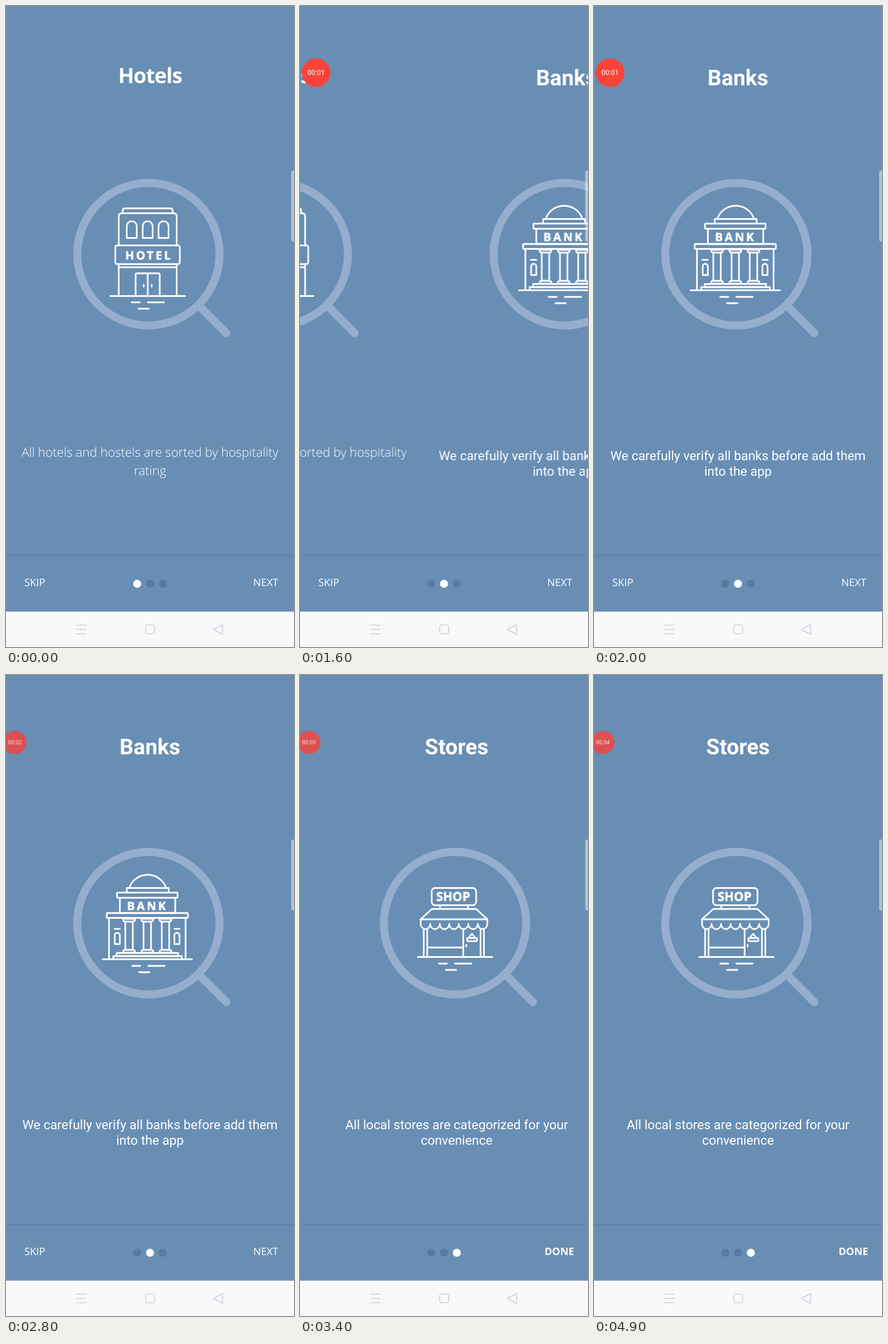
An HTML page for the animation above (5000 ms loop, 502 by 1115 pixels).

```html
<!DOCTYPE html>
<html lang="en">
<head>
<meta charset="utf-8">
<title>Onboarding</title>
<style>
html, body { margin: 0; width: 100%; height: 100%; overflow: hidden; background: #688eb4; }
svg { position: absolute; left: 0; top: 0; display: block; }
.anim { animation: 5s infinite; }
text { fill: #fff; text-rendering: geometricPrecision; }
.mid { text-anchor: middle; }
.title { font: 700 38px Roboto, sans-serif; }
.copy { font: 400 22.4px Roboto, sans-serif; }
.title.soft { font: 700 36.5px "Noto Sans", sans-serif; letter-spacing: -1px; }
.copy.soft { font: 300 21.8px "Open Sans", sans-serif; }
.button { font: 400 17.8px "Open Sans", sans-serif; }
.done { font: 700 17.8px "Noto Sans", sans-serif; }
.sign { font: 700 20px "Noto Sans", sans-serif; stroke-width: .6; }
.icon { fill: none; stroke: #fff; stroke-width: 2.8; stroke-linecap: round; stroke-linejoin: round; }
.lens { fill: none; stroke: #95aecd; stroke-width: 14; stroke-linecap: round; }
.nav { fill: none; stroke: #d0cfd4; stroke-width: 1.5; stroke-linejoin: round; }

#track { animation-name: swipe; }
@keyframes swipe {
  0%, 26.8% { transform: translateX(0); animation-timing-function: cubic-bezier(.5, 0, .8, .7); }
  32% { transform: translateX(-287px); animation-timing-function: cubic-bezier(.2, .54, .3, 1); }
  39% { transform: translateX(-502px); animation-timing-function: linear; }
  61.4% { transform: translateX(-502px); animation-timing-function: cubic-bezier(.5, 0, .8, .7); }
  64% { transform: translateX(-733px); animation-timing-function: cubic-bezier(.2, .54, .3, 1); }
  71%, 100% { transform: translateX(-1004px); }
}
#dot { animation-name: page; animation-timing-function: step-end; }
@keyframes page {
  0% { transform: translateX(0); }
  30% { transform: translateX(22.3px); }
  63%, 100% { transform: translateX(44.6px); }
}
#skip, #done { animation-name: last; animation-timing-function: step-end; }
#done { --a: 0; --b: 1; }
#skip { --a: 1; --b: 0; }
@keyframes last { 0% { opacity: var(--a); } 63%, 100% { opacity: var(--b); } }

#badge {
  position: absolute; left: 3px; top: 91px; width: 50px; height: 50px; border-radius: 50%;
  background: #f84338; color: #fff; font: 400 12px/16px Roboto, sans-serif; text-align: center;
  animation-name: dock;
}
@keyframes dock {
  0%, 3.99% { opacity: 0; transform: none; }
  4%, 48% { opacity: 1; transform: none; animation-timing-function: ease-out; }
  56%, 100% { opacity: .8; transform: translate(-12.7px, 1.3px) scale(.81); }
}
#clock { position: absolute; top: 17px; width: 100%; height: 16px; overflow: hidden; }
#ticks { animation-name: tick; animation-timing-function: step-end; }
#ticks span { display: block; }
@keyframes tick {
  0% { transform: translateY(0); }
  26% { transform: translateY(-16px); }
  46% { transform: translateY(-32px); }
  66% { transform: translateY(-48px); }
  86%, 100% { transform: translateY(-64px); }
}
</style>
</head>
<body>
<svg width="502" height="1115" viewBox="0 0 502 1115">
  <defs>
    <g id="lens" class="lens">
      <circle cx="248.2" cy="431.7" r="124"/>
      <path d="M338 523L384 569"/>
    </g>
    <path id="arch" d="M210.5 403.5V383a8.7 8.7 0 0 1 17.4 0V403.5z"/>
    <path id="column" d="M-6.5 429V478M6.5 429V478M-10.5 424H10.5Q10.5 429 6.5 429H-6.5Q-10.5 429 -10.5 424zM-10.5 483Q-10.5 478 -6.5 478H6.5Q10.5 478 10.5 483z"/>
    <path id="shade" d="M0 0H14M28 0H56.5M12 11H30"/>
  </defs>
  <rect width="502" height="1115" fill="#688eb4"/>

  <g id="track" class="anim">
    <g>
      <text class="title soft mid" x="251" y="134">Hotels</text>
      <use href="#lens"/>
      <g class="icon">
        <path d="M203.5 360V356q0-4 4-4H286.5q4 0 4 4V360M196.5 416V366q0-5.5 5.5-5.5H292q5.5 0 5.5 5.5V416"/>
        <use href="#arch"/><use href="#arch" x="27.7"/><use href="#arch" x="55.4"/>
        <rect x="190.5" y="416.5" width="112.5" height="32.5" rx="3"/>
        <path d="M196.5 449V504M297.5 449V504M196.5 454.5H297.5M182 504.5H312"/>
        <path d="M226 504V467q0-2 2-2H266q2 0 2 2V504M247 465V504M240 485v3M254 485v3"/>
        <use href="#shade" x="219" y="515.5"/>
        <text class="sign" x="208" y="440.5" letter-spacing="3.5">HOTEL</text>
      </g>
      <text class="copy soft mid" x="251" y="784">All hotels and hostels are sorted by hospitality</text>
      <text class="copy soft mid" x="251" y="816">rating</text>
    </g>

    <g transform="translate(502)">
      <text class="title mid" x="251" y="138">Banks</text>
      <use href="#lens"/>
      <g class="icon">
        <path d="M215 370A34 34 0 0 1 279 370"/>
        <rect x="210.5" y="370.5" width="73" height="8"/>
        <rect x="193.5" y="378.5" width="105.5" height="9" rx="1"/>
        <rect x="198.5" y="387.5" width="96.5" height="26.5"/>
        <rect x="175.5" y="414" width="141.5" height="8.5" rx="1"/>
        <path d="M179.5 423V494M313 423V494M168.5 494.5H324"/>
        <use href="#column" x="214.5"/><use href="#column" x="246.3"/><use href="#column" x="278"/>
        <rect x="193" y="483.5" width="107" height="5.5"/>
        <rect x="187" y="489" width="119.5" height="5.5"/>
        <path d="M189.5 468V453a4.5 4.5 0 0 1 9 0V468zM293.5 468V453a4.5 4.5 0 0 1 9 0V468zM189 441.5h9.5M293.5 441.5h9.5"/>
        <use href="#shade" x="220" y="506"/>
        <text class="sign" x="211" y="408.5" letter-spacing="3.6">BANK</text>
      </g>
      <text class="copy mid" x="251" y="790">We carefully verify all banks before add them</text>
      <text class="copy mid" x="251" y="816.5">into the app</text>
    </g>

    <g transform="translate(1004)">
      <text class="title mid" x="251" y="138">Stores</text>
      <use href="#lens"/>
      <g class="icon">
        <rect x="207.5" y="370.5" width="77.5" height="30" rx="6"/>
        <path d="M222 401V407M271 401V407M188 425L208 407H285L304.5 425"/>
        <path d="M188.3 425H304.5V433a8.3 9 0 0 1-16.6 0a8.3 9 0 0 1-16.6 0a8.3 9 0 0 1-16.6 0a8.3 9 0 0 1-16.6 0a8.3 9 0 0 1-16.6 0a8.3 9 0 0 1-16.6 0a8.3 9 0 0 1-16.6 0z"/>
        <path d="M193.7 442V490M199.7 442V490M292.7 442V490M298.6 442V490M262.5 442V490M200 474H262M183.5 490.5H313M267.7 469.5v2.5"/>
        <path d="M271.5 457.5L277.5 450L283.5 457.5"/>
        <rect x="269" y="457.5" width="17.5" height="5.5" rx="2"/>
        <use href="#shade" x="220" y="502"/>
        <text class="sign" x="215.5" y="392.5" style="font-size:21.5px">SHOP</text>
      </g>
      <text class="copy mid" x="251" y="790">All local stores are categorized for your</text>
      <text class="copy mid" x="251" y="816.5">convenience</text>
    </g>
  </g>

  <path d="M0 955.5H502" stroke="#5a7fa6" stroke-width="1.5"/>
  <g fill="#567ba2">
    <circle cx="228.7" cy="1005" r="7"/><circle cx="251" cy="1005" r="7"/><circle cx="273.3" cy="1005" r="7"/>
  </g>
  <circle id="dot" class="anim" cx="228.7" cy="1005" r="7" fill="#fff"/>
  <g id="skip" class="anim">
    <text class="button" x="32" y="1008.5">SKIP</text>
    <text class="button" x="474.5" y="1008.5" text-anchor="end">NEXT</text>
  </g>
  <text id="done" class="done anim mid" x="452" y="1008.5">DONE</text>

  <rect x="497" y="286" width="12" height="124" rx="4" fill="#fff" opacity=".45"/>

  <rect y="1053.5" width="502" height="62" fill="#f9f8fb"/>
  <g class="nav">
    <path d="M122 1077H140M122 1084.5H140M122 1092H140"/>
    <rect x="243.5" y="1076.5" width="15.5" height="15.5" rx="3.5"/>
    <path d="M361.5 1084.5L377.5 1076V1093z"/>
  </g>
</svg>
<div id="badge" class="anim">
  <div id="clock"><div id="ticks" class="anim">
    <span>00:00</span><span>00:01</span><span>00:02</span><span>00:03</span><span>00:04</span>
  </div></div>
</div>
</body>
</html>
```
